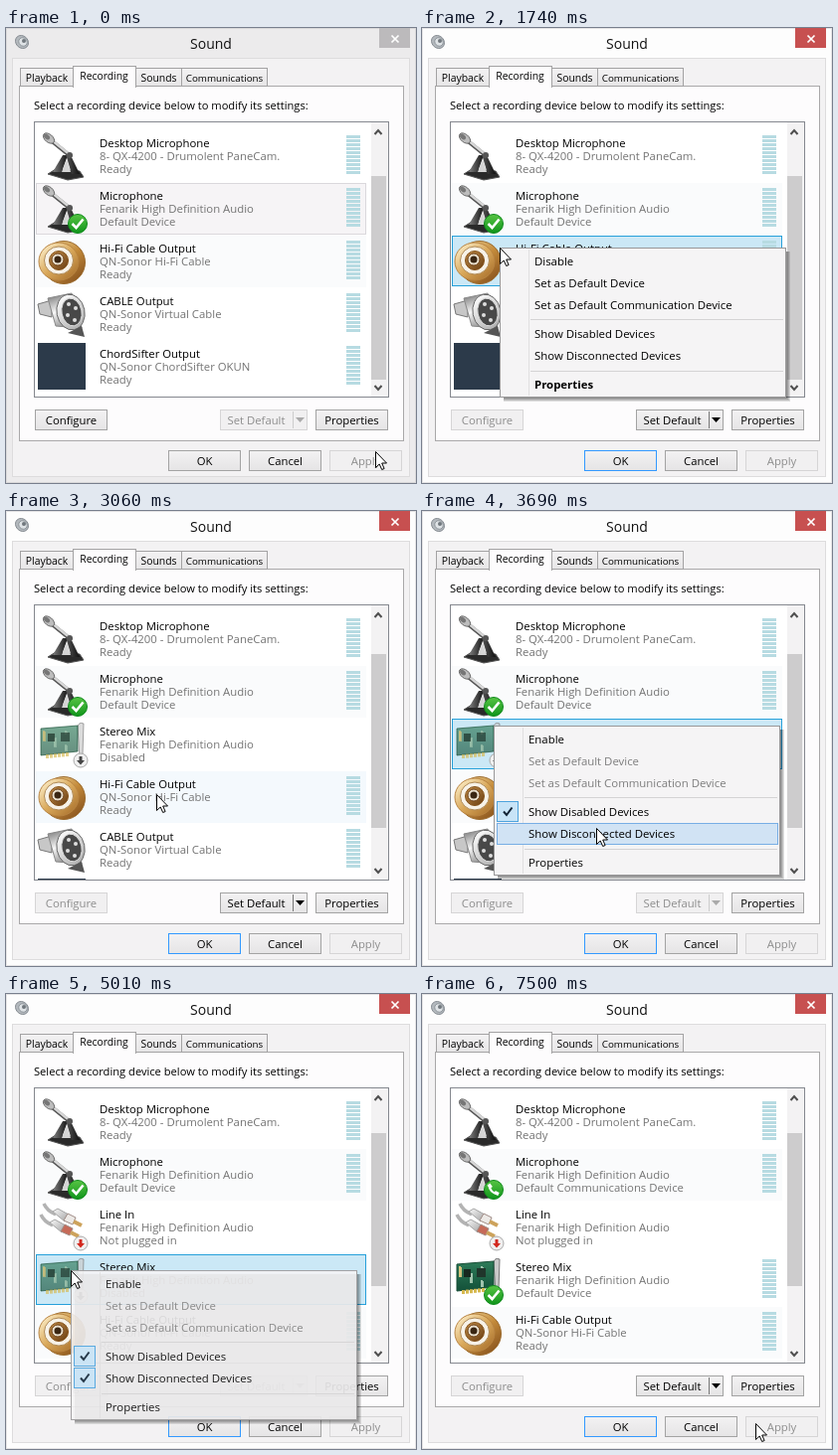
Recreate the animation shown at these times as an HTML page with a canvas. Size 412 px wide and 458 px high, loop 7.53 s.

```html
<!DOCTYPE html>
<html>
<head>
<meta charset="utf-8">
<title>Sound</title>
<style>
html, body { margin: 0; width: 100%; height: 100%; overflow: hidden; }
canvas { display: block; }
</style>
</head>
<body>
<canvas id="stage" width="412" height="458"></canvas>
<script>
const c = document.getElementById('stage').getContext('2d');
const LOOP = 7530, STEP = 30;
const ACTIVE = 1620, REFRESH = [2700, 4200, 6150];

// cursor stops: time, x, y
const STOPS = [
  [0, 371, 426], [90, 353, 439], [240, 353, 439], [360, 352, 438], [720, 352, 438],
  [1200, 29, 217], [1320, 29, 217], [1560, 78, 221], [1770, 78, 221], [2100, 166, 298],
  [3000, 166, 298], [3240, 72, 216], [3390, 72, 216], [3690, 175, 319], [4080, 175, 319],
  [4320, 82, 275], [4470, 82, 275], [4590, 65, 278], [5070, 65, 278], [5430, 104, 293],
  [7080, 104, 293], [7500, 335, 432]
];

// chosen: index of the item that is clicked
const MENUS = [
  { open: 1620, close: 2520, x: 78, y: 221, first: 'Disable', checks: 0, chosen: 3 },
  { open: 3270, close: 4020, x: 72, y: 216, first: 'Enable', checks: 1, chosen: 4 },
  { open: 4920, close: 6060, x: 65, y: 278, first: 'Enable', checks: 2, chosen: 0 }
];
const ITEM_Y = [3, 25, 47, 76, 98, 127];

function cursorAt(t) {
  const i = STOPS.findIndex(s => s[0] > t);
  if (i < 0) return STOPS[STOPS.length - 1].slice(1);
  const [t0, x0, y0] = STOPS[i - 1], [t1, x1, y1] = STOPS[i];
  const u = (t - t0) / (t1 - t0), e = u * u * (3 - 2 * u);
  return [Math.round(x0 + (x1 - x0) * e), Math.round(y0 + (y1 - y0) * e)];
}

function box(x, y, w, h, fill, line) {
  if (fill) { c.fillStyle = fill; c.fillRect(x, y, w, h); }
  if (line) { c.strokeStyle = line; c.lineWidth = 1; c.strokeRect(x + .5, y + .5, w - 1, h - 1); }
}

function path(d, fill, line, width = 1) {
  const p = new Path2D(d);
  if (fill) { c.fillStyle = fill; c.fill(p); }
  if (line) { c.strokeStyle = line; c.lineWidth = width; c.stroke(p); }
}

function disc(x, y, rx, fill, line, ry = rx, turn = 0) {
  c.beginPath();
  c.ellipse(x, y, rx, ry, turn, 0, 7);
  c.fillStyle = fill;
  c.fill();
  if (line) { c.strokeStyle = line; c.lineWidth = 1; c.stroke(); }
}

function text(s, x, y, color = '#000', size = 11.35, align = 'left', weight = '') {
  c.font = `${weight} ${size}px "Open Sans", "Noto Sans", sans-serif`;
  c.textAlign = align;
  c.fillStyle = color;
  c.fillText(s, x, y);
}

function blend(x0, y0, x1, y1, ...colors) {
  const g = c.createLinearGradient(x0, y0, x1, y1);
  colors.forEach((k, i) => g.addColorStop(i / (colors.length - 1), k));
  return g;
}

const ICONS = {
  mic() {
    path('M10 42L18 37 42 39 46 45 30 48Z', '#2a2a2a', '#555');
    path('M25 23L30 23 24 40 15 40Z', blend(16, 0, 28, 0, '#777', '#222'));
    path('M28 22L32 21 42 42 34 42Z', blend(28, 0, 42, 0, '#555', '#111'));
    path('M29 27L33 40 24 40Z', '#d5d5d5');
    path('M13 8L34 25', null, '#555', 4);
    path('M13 7L34 24', null, '#d8d8d8', 2.4);
    disc(32, 23, 3, '#555');
    disc(11, 6, 6.5, '#bdbdbd', '#666', 4, .7);
    disc(9, 4.5, 3.5, '#777', null, 2.2, .7);
  },
  rca() {
    disc(26, 25, 21.5, blend(8, 4, 42, 46, '#f1d79a', '#c38a3a', '#85501c'), '#9b6a2c');
    disc(21, 24, 20, blend(4, 6, 38, 42, '#fff3d0', '#d9a85a', '#a86f2b'), '#b98442', 19);
    disc(21, 23, 14.5, '#f7f2e8', '#b08a55', 14);
    disc(21, 23, 9.5, blend(13, 14, 29, 32, '#c08a45', '#6d4115'), '#85521a');
    disc(20, 22, 6, '#e9dfcd', '#70451c');
    disc(20, 22, 3.5, '#3a2613');
  },
  jack() {
    path('M0 14L14 10 14 27 2 24Z', '#c7c7c7', '#777');
    path('M10 8L34 3 44 38 18 36Z', blend(12, 4, 24, 40, '#777', '#f7f7f7', '#888'), '#888');
    disc(33, 22, 14, blend(20, 8, 46, 38, '#fff', '#aaa'), '#666', 18, -.2);
    disc(34, 22, 10, '#484848', '#ddd', 14, -.2);
    for (const [x, y] of [[31, 14], [38, 18], [30, 25], [37, 30]]) disc(x, y, 2, '#ddd');
    path('M30 43L44 36 47 47Z', '#555');
  },
  plain() { box(0, 0, 48, 47, '#2c3a4a'); },
  line() {
    for (const [dx, dy, tone] of [[4, -2, '#ece9e6'], [1, 9, '#c66a58']]) {
      c.save();
      c.translate(dx, dy);
      path('M2 2Q5 9 14 13', null, '#b3b3b3', 3.5);
      path('M11 10L16 7 27 13 23 20Z', blend(14, 8, 24, 20, '#eee', '#aaa'), '#a5a5a5');
      path('M22 19L26 12 34 16 31 23Z', tone, '#a08c86');
      path('M32 20L40 24', null, '#cda35c', 4);
      c.restore();
    }
  },
  card() {
    path('M40 6Q41 1 46 3L45 34 42 37Z', '#c9c9c9', '#777');
    path('M3 8L40 5 40 31 3 35Z', blend(0, 4, 0, 36, '#2f7d5a', '#124f38'), '#174d35');
    for (let i = 0; i < 28; i++) {
      const x = 5 + i * 11 % 33, y = 10 + i * 7 % 20;
      box(x, y, 2 + i % 2, 2, i % 3 ? '#9fc3ac' : '#d2c27c');
    }
    box(10, 13, 7, 8, '#16281f');
    box(23, 12, 9, 9, '#20352b');
    for (let i = 0; i < 6; i++) box(8 + i * 4, 34 - i * .4, 3, 4, '#d6b94f');
  }
};

const BADGES = {
  check() {
    disc(40, 39, 9.5, blend(0, 29, 0, 48, '#59c545', '#12961c'), '#0e8a1b');
    path('M34.5 39L38.5 43 45.5 34.5', null, '#fff', 2.6);
  },
  phone() {
    disc(40, 39, 9.5, blend(0, 29, 0, 48, '#59c545', '#12961c'), '#0e8a1b');
    path('M35.5 34.5Q36 42 44.5 43.5', null, '#fff', 2.2);
    path('M35 33.5L37.5 37M41 41.5L45 43.5', null, '#fff', 3.4);
  },
  red() { arrowBadge('#d2281e'); },
  dark() { arrowBadge('#444'); }
};

function arrowBadge(color) {
  disc(43, 40, 7, '#f0f0f0', '#aaa');
  path('M41.5 36H44.5V40H47L43 44.5 39 40H41.5Z', color);
}

function devices(t) {
  const done = t >= REFRESH[2], hd = 'Fenarik High Definition Audio';
  const dev = (id, icon, name, info, state, badge, meter = true) => ({ id, icon, name, info, state, badge, meter });
  const desk = dev('desk', 'mic', 'Desktop Microphone', '8- QX-4200 - Drumolent PaneCam.', 'Ready');
  const mic = dev('mic', 'mic', 'Microphone', hd, done ? 'Default Communications Device' : 'Default Device', done ? 'phone' : 'check');
  const line = dev('line', 'line', 'Line In', hd, 'Not plugged in', 'red', false);
  const mix = dev('mix', 'card', 'Stereo Mix', hd, done ? 'Default Device' : 'Disabled', done ? 'check' : 'dark', done);
  const hifi = dev('hifi', 'rca', 'Hi-Fi Cable Output', 'QN-Sonor Hi-Fi Cable', 'Ready');
  const cable = dev('cable', 'jack', 'CABLE Output', 'QN-Sonor Virtual Cable', 'Ready');
  const mixer = dev('mixer', 'plain', 'ChordSifter Output', 'QN-Sonor ChordSifter OKUN', 'Ready');
  if (t < REFRESH[0]) return [desk, mic, hifi, cable, mixer];
  if (t < REFRESH[1]) return [desk, mic, mix, hifi, cable, mixer];
  return [desk, mic, line, mix, hifi, cable];
}

function selected(t) {
  if (t < ACTIVE) return 'mic';
  if (t < REFRESH[0]) return 'hifi';
  const inMenu = (t >= 3270 && t < REFRESH[1]) || (t >= 4920 && t < REFRESH[2]);
  return inMenu ? 'mix' : '';
}

function drawRow(d, y, t, hover) {
  if (d.id === selected(t)) {
    if (t < ACTIVE) box(30, y, 332, 52, '#f6f4f6', '#dad8dc');
    else box(30, y, 332, 51, '#cbe8f6', '#26a0da');
  } else if (hover) box(30, y, 332, 52, '#f4f9fd');
  else if (d.id === 'mic' || d.id === 'hifi') box(30, y, 332, 52, '#fafbfc');
  c.save();
  c.translate(32, y + 2);
  c.save();
  if (d.badge === 'dark') c.globalAlpha *= .65;
  ICONS[d.icon]();
  c.restore();
  if (d.badge) BADGES[d.badge]();
  c.restore();
  text(d.name, 94, y + 17);
  text(d.info, 94, y + 30, '#747474');
  text(d.state, 94, y + 43, '#747474');
  if (d.meter) for (let i = 0; i < 10; i++) box(342, y + 5 + i * 4, 14, 3, '#b7dbe2');
}

function drawList(t, cx, cy) {
  box(28, 94, 357, 278, '#fff', '#85888f');
  c.save();
  c.beginPath();
  c.rect(29, 95, 355, 276);
  c.clip();
  const menuUp = MENUS.some(m => t >= m.open && t < m.close);
  devices(t).forEach((d, i) => {
    const y = 103 + 53 * i;
    drawRow(d, y, t, !menuUp && cx > 28 && cx < 362 && cy >= y && cy < Math.min(y + 53, 371));
  });
  c.restore();
  const k = t < REFRESH[0] ? 0 : t < REFRESH[1] ? 1 : 2;
  const top = [149, 144, 140][k], end = [354, 319, 294][k];
  box(367, 95, 17, 276, '#f3f2f3');
  box(367, top, 15, end - top, '#cdcccd');
  path('M370.5 107L374 103 377.5 107M370.5 360L374 364 377.5 360', null, '#505050', 2);
}

function button(label, x, y, w, on = true, line = '#a3a3a3', mid = w / 2) {
  box(x, y, w, 21, on ? blend(0, y, 0, y + 21, '#f3f2f3', '#e5e4e5') : '#f1f0f1', on ? line : '#d6d5d6');
  text(label, x + mid, y + 15, on ? '#000' : '#8d8d8d', 11.3, 'center');
}

function drawWindow(t, cx, cy) {
  const on = t >= ACTIVE;
  box(0, 0, 412, 458, on ? '#fdfdfd' : '#ecebec', on ? '#e6e5e6' : '#dad9da');
  box(6, 30, 400, 422, '#f3f2f3', '#dddcdd');
  box(375, 0, 31, 20, on ? '#c75050' : '#bcbabc');
  path('M387.5 7.5L394.5 14.5M394.5 7.5L387.5 14.5', null, '#fff', 1.7);
  disc(16, 14, 7, '#b4b9be', '#858b91', 6, .8);
  disc(17, 14, 4.5, '#dfe3e6', '#8d949a', 4, .8);
  disc(18, 13, 2, '#70777d');
  text('Sound', 206, 20.5, '#111', 14, 'center');

  box(13, 58, 387, 358, '#fdfcfd', '#a9a8a9');
  const tabs = [['Playback', 14, 54], ['Sounds', 130, 47], ['Communications', 176, 87]];
  for (const [s, x, w] of tabs) {
    box(x, 40, w, 19, blend(0, 40, 0, 58, '#f3f2f3', '#e7e6e7'), '#a3a2a3');
    text(s, x + w / 2, 54, '#000', w > 80 ? 9.8 : 10.4, 'center');
  }
  box(67, 38, 64, 22, '#fdfcfd', '#a3a2a3');
  box(68, 57, 62, 4, '#fdfcfd');
  text('Recording', 98.5, 52, '#000', 10.4, 'center');
  text('Select a recording device below to modify its settings:', 28, 82, '#000', 11.15);

  drawList(t, cx, cy);

  const setOn = (t >= ACTIVE && t < 3270) || t >= 6570;
  button('Configure', 29, 384, 73, !on);
  button('Set Default', 215, 384, 88, setOn, '#a3a3a3', 36.5);
  box(288, 386, 1, 17, setOn ? '#777' : '#ccc');
  path('M291 392H300L295.5 397Z', setOn ? '#000' : '#aaa');
  button('Properties', 311, 384, 73);
  button('OK', 163, 425, 73, true, on ? '#3399ff' : '#a3a3a3');
  button('Cancel', 244, 425, 73);
  button('Apply', 325, 425, 73, false);
}

function drawItem(m, i, hot) {
  const labels = [m.first, 'Set as Default Device', 'Set as Default Communication Device',
    'Show Disabled Devices', 'Show Disconnected Devices', 'Properties'];
  const y = ITEM_Y[i], off = m.checks && (i === 1 || i === 2);
  if (hot) box(3, y, 283, 22, '#d1e3f4', '#78aee5');
  if (i >= 3 && i < 3 + m.checks) {
    box(3, y, 22, 21, '#c8e4f7', '#4da3dd');
    path(`M10 ${y + 10.5}L13 ${y + 14} 18.5 ${y + 6.5}`, null, '#123', 2);
  }
  text(labels[i], 35, y + 15, off ? '#7d7d7d' : '#000', 11.4, 'left', i === 5 && !m.checks ? 'bold' : '');
}

function drawMenu(m, t, cx, cy) {
  if (t < m.open || t > m.close + 240) return;
  const hot = ITEM_Y.findIndex(y => cy - m.y >= y && cy - m.y < y + 22 && cx > m.x + 3);
  c.save();
  c.translate(m.x, m.y);
  if (t >= m.close) {
    // only the chosen item lingers
    c.globalAlpha = .62 * (1 - (t - m.close) / 240);
    drawItem(m, m.chosen, true);
  } else {
    c.globalAlpha = Math.min(1, (t - m.open + 60) / 170);
    for (let i = 1; i < 5; i++) box(4, 4, 284 + i, 147 + i, 'rgba(0,0,0,.13)');
    box(0, 0, 288, 151, '#f5f4f5', '#999899');
    box(29, 2, 1, 147, '#e0dfe0');
    box(31, 72, 254, 1, '#d4d3d4');
    box(31, 124, 254, 1, '#d4d3d4');
    ITEM_Y.forEach((y, i) => drawItem(m, i, i === hot));
  }
  c.restore();
}

function draw(now) {
  const t = Math.floor(now % LOOP / STEP) * STEP;
  const [x, y] = cursorAt(t);
  drawWindow(t, x, y);
  for (const m of MENUS) drawMenu(m, t, x, y);
  c.save();
  c.translate(x + .5, y + .5);
  path('M0 0V16L3.7 12.5 6.2 18 8.6 17 6.2 11.5H11Z', '#fff', '#000');
  c.restore();
}

const start = performance.now();
function tick() {
  draw(performance.now() - start);
  requestAnimationFrame(tick);
}
tick();
</script>
</body>
</html>
```
